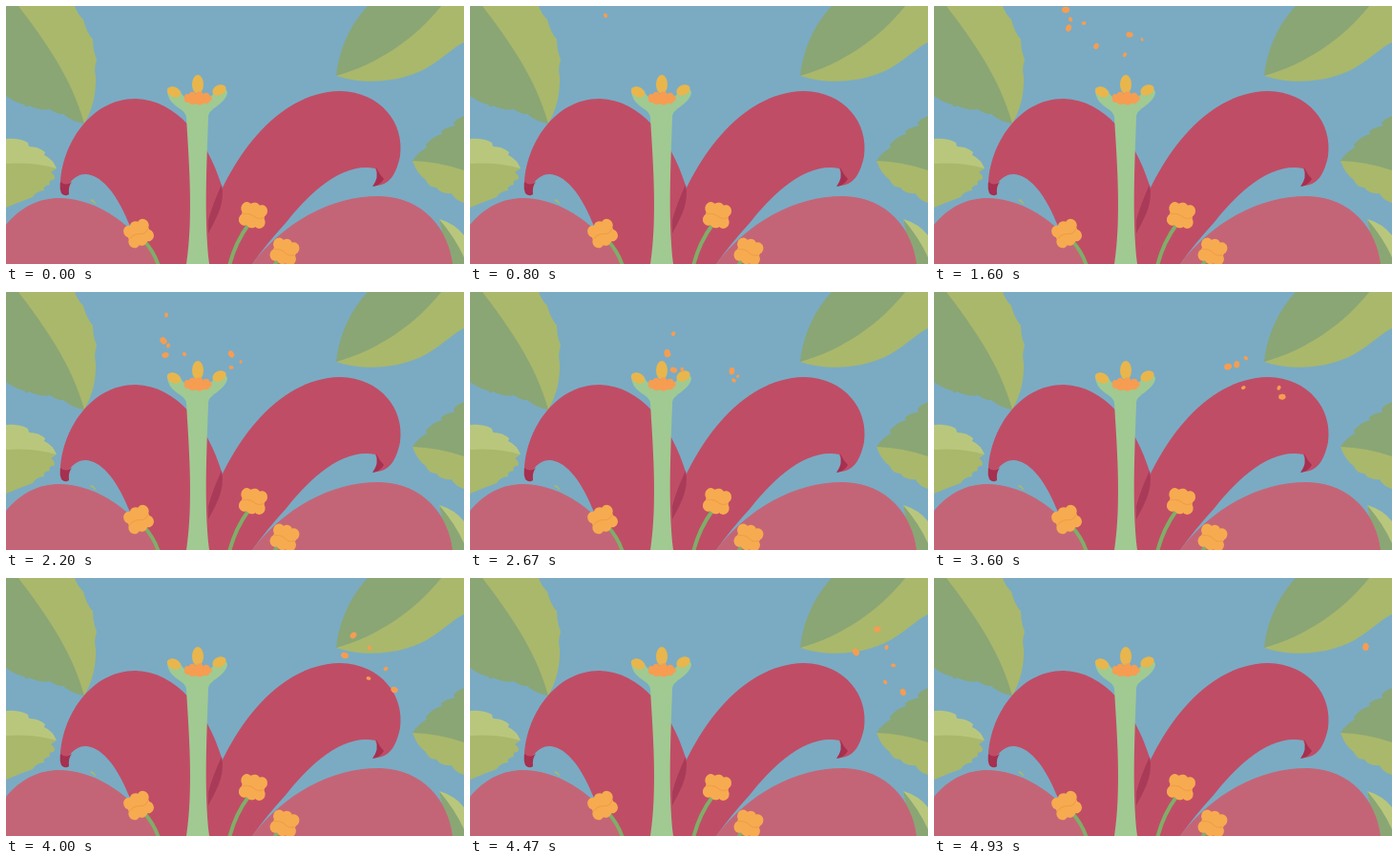
These frames come from a looping animation (480x270 px, 4.99 s). An HTML page with a canvas:

```html
<!DOCTYPE html>
<html lang="en">
<head>
<meta charset="utf-8">
<title>Pollen drifting over a flower</title>
<style>
html, body { margin: 0; width: 100%; height: 100%; overflow: hidden; background: #7aabc3; }
canvas { display: block; width: 480px; height: 270px; }
</style>
</head>
<body>
<canvas id="stage" width="480" height="270"></canvas>
<script>
const ctx = document.getElementById('stage').getContext('2d');
const LOOP = 4990, STEP = 200 / 3;
const SKY = '#7aabc3', RED = '#c04d66', PINK = '#c46577', SHADE = '#a72f4f';
const OLIVE = '#aab86b', SAGE = '#8aa675', PALE = '#b9c77d';
const STEM = '#a0ca92', STALK = '#7fae68', AMBER = '#e8b64c', ORANGE = '#f7ab50', POLLEN = '#f69d52';

function fill(color, d) {
  ctx.fillStyle = color;
  ctx.fill(new Path2D(d));
}

function oval(color, x, y, rx, ry = rx, turn = 0) {
  ctx.fillStyle = color;
  ctx.beginPath();
  ctx.ellipse(x, y, rx, ry, turn, 0, Math.PI * 2);
  ctx.fill();
}

function leaves() {
  fill(OLIVE, 'M0 0H72Q76 10 81 14Q84 27 91 35Q91 46 95 56Q92 66 94 74Q95 101 82 123Q45 70 0 0Z');
  fill(SAGE, 'M0 0H13C39 34 69 75 82 123Q69 121 60 113Q54 114 46 108Q36 110 24 104Q22 108 19 103Q9 101 0 94Z');

  fill(OLIVE, 'M346 73C390 60 430 30 456 0H480V38C468 44 461 52 450 59C420 81 375 83 346 73Z');
  fill(SAGE, 'M346 73C349 44 362 18 379 0H456C430 33 390 61 346 73Z');

  fill(PALE, 'M0 139Q14 138 23 143L24 147Q34 147 41 153L40 156Q49 160 53 170L0 167Z');
  fill(OLIVE, 'M0 165Q27 163 53 170L47 174Q53 178 50 182Q44 182 46 187Q38 188 40 193Q31 194 28 200Q14 205 0 211Z');

  fill(SAGE, 'M426 162Q432 153 441 148L440 145Q448 136 457 134L456 131Q463 126 470 126L469 122Q474 117 480 115V173Z');
  fill(OLIVE, 'M426 162Q454 163 480 172V206Q470 203 467 196Q456 197 451 190Q442 189 440 182Q431 176 426 162Z');

  fill(PALE, 'M454 223Q471 228 480 240V270H466Z');
  fill(SAGE, 'M454 223Q471 243 480 263V270H464Z');
  fill(OLIVE, 'M88 203Q91 200 95 208Z');
}

function petals() {
  // back left petal with its curled tip
  fill(RED, 'M57 187C58 146 88 97 136 97C178 98 211 139 226 188C229 214 212 238 212 270H150L128 226C111 183 84 163 67 185L62 198Z');
  fill(SHADE, 'M57 184Q63 189 69 184Q65 189 66 197Q62 200 58 196Q56 191 57 184Z');

  // back right petal
  fill(RED, 'M212 270V228C232 165 282 90 350 89C393 90 418 123 413 157C409 177 401 188 387 188Q391 178 387 170C350 163 316 199 294 226Q273 249 258 270Z');
  fill(SHADE, 'M388 169Q391 176 396 181Q392 188 384 189Q391 180 388 169Z');
  fill('#a93b59', 'M226 187C230 207 220 223 212 238V224Q217 206 226 187Z');

  // front petals
  fill(PINK, 'M0 229C19 206 43 198 68 202C104 207 139 235 161 270H0Z');
  fill(PINK, 'M258 270C291 226 342 198 393 199C437 201 463 232 468 270Z');
}

function stalk(d) {
  ctx.strokeStyle = STALK;
  ctx.lineWidth = 4;
  ctx.stroke(new Path2D(d));
}

function anther(x, y, turn) {
  ctx.save();
  ctx.translate(x, y);
  ctx.rotate(turn);
  oval(ORANGE, 0, 0, 12, 10);
  for (const side of [-1, 1]) {
    oval(ORANGE, -8, side * 6, 6, 6.5);
    oval(ORANGE, 0, side * 8, 6, 5.5);
    oval(ORANGE, 8, side * 6, 6, 6.5);
  }
  ctx.strokeStyle = '#ef9d48';
  ctx.lineWidth = 1;
  ctx.stroke(new Path2D('M-11 1Q-4 -2 1 1T11 0'));
  ctx.restore();
}

function pistil() {
  fill(STEM, 'M169 87C174 83 183 87 184 92Q190 100 201 101Q212 101 217 92C220 85 232 84 232 91C229 104 213 106 212 116C211 154 207 220 213 270H189C197 220 191 154 189 116C188 106 169 106 169 87Z');
  oval(AMBER, 201, 82, 6, 10);
  oval(AMBER, 176, 90, 7.5, 5.2, 0.45);
  oval(AMBER, 223.5, 88, 7.5, 5.2, -0.45);
  oval(POLLEN, 201, 97, 13, 5.5);
  for (let i = 0; i < 9; i++) {
    const a = i * Math.PI * 2 / 9;
    oval(POLLEN, 201 + 11.5 * Math.cos(a), 96.5 + 4 * Math.sin(a), 3.2);
  }
}

function scene() {
  ctx.fillStyle = SKY;
  ctx.fillRect(0, 0, 480, 270);
  leaves();
  petals();
  stalk('M145 246Q155 257 160 272');
  stalk('M254 229Q240 248 234 272');
  stalk('M287 262L281 272');
  anther(139, 238, -0.45);
  anther(259, 219, 0.2);
  anther(292, 257, 0.3);
  pistil();
}

// Grains pass through these points at the shared times
const times = [800, 1600, 2200, 3200, 4000, 4930];
const grains = [
  { r: 2.3, p: [[142, 10], [200, 51], [236, 79], [326, 102], [398, 95], [490, 88]] },
  { r: 3.4, p: [[150, -12], [205, 30], [236, 65], [324, 99], [407, 117], [500, 120]] },
  { r: 1.7, p: [[160, -8], [218, 35], [246, 73], [326, 101], [406, 118], [500, 121]] },
  { r: 3, p: [[125, -12], [170, 42], [200, 93]] },
  { r: 3.7, p: [[110, -40], [138, 4], [165, 51], [262, 72], [355, 81], [452, 72]] },
  { r: 2.3, p: [[115, -35], [143, 14], [170, 56], [260, 71], [356, 81], [453, 72]] },
  { r: 3.4, p: [[115, -30], [141, 23], [167, 66], [274, 88], [364, 60], [492, 50]] },
  { r: 2.2, p: [[125, -25], [157, 18], [187, 65], [272, 93], [380, 105], [488, 112]] },
  { r: 2.3, p: [[130, -70], [140, -14], [168, 24], [274, 61], [381, 73], [490, 70]] }
];

function slope(p, i, axis) {
  const a = Math.max(i - 1, 0), b = Math.min(i + 1, p.length - 1);
  return (p[b][axis] - p[a][axis]) / (times[b] - times[a]);
}

function along(p, t, axis) {
  if (t < times[0]) return p[0][axis] + slope(p, 0, axis) * (t - times[0]);
  let i = 0;
  while (i < p.length - 2 && t > times[i + 1]) i++;
  const span = times[i + 1] - times[i], u = (t - times[i]) / span, v = 1 - u;
  return v * v * (1 + 2 * u) * p[i][axis] + u * u * (3 - 2 * u) * p[i + 1][axis]
    + span * u * v * (v * slope(p, i, axis) - u * slope(p, i + 1, axis));
}

function pollen(t) {
  if (t < 590) return;
  grains.forEach(({ r, p }, i) => {
    if (t > times[p.length - 1] + 10) return;
    const turn = i + t / 700;
    oval(POLLEN, along(p, t, 0), along(p, t, 1), r * 1.1, r * 0.85, turn);
  });
}

function draw(now) {
  const t = Math.floor((now % LOOP + 3.4) / STEP) * STEP;
  scene();
  pollen(t);
  requestAnimationFrame(draw);
}
draw(0);
</script>
</body>
</html>
```
